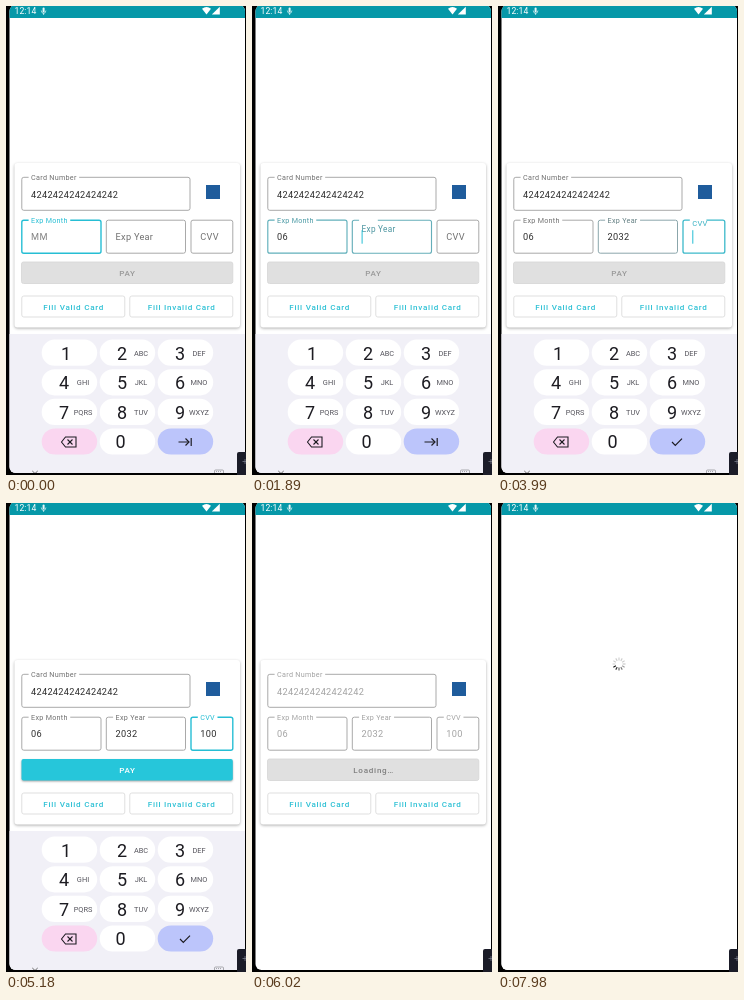
Animation of 240 by 469 pixels, one loop 8000 ms. Source, as an HTML page with a canvas:

```html
<!DOCTYPE html>
<html lang="en">
<head>
<meta charset="utf-8">
<title>Card payment form</title>
<style>
  html, body { margin: 0; width: 100%; height: 100%; overflow: hidden; background: #000; }
  canvas { display: block; width: 240px; height: 469px; }
</style>
</head>
<body>
<canvas id="stage"></canvas>
<script>
const LOOP = 8000;
const TO_YEAR = 1818, TO_CVV = 3882, PAY_TAP = 5210, NEW_PAGE = 6300, SPIN_START = 7280;
const CYAN = [38, 190, 212], GRAY = [160, 160, 160], LABEL = [112, 112, 112];
const INK = '#2b2b2b', FADED = '#a2a2a2';

const canvas = document.getElementById('stage');
const ctx = canvas.getContext('2d');
const ratio = window.devicePixelRatio || 1;
canvas.width = 240 * ratio;
canvas.height = 469 * ratio;

const ramp = (t, start, length = 150) => {
  const x = Math.min(1, Math.max(0, (t - start) / length));
  return x * x * (3 - 2 * x);
};
const lerp = (a, b, k) => a + (b - a) * k;
const mix = (a, b, k) => `rgb(${a.map((v, i) => lerp(v, b[i], k)).join()})`;

// Typed text: one character appears at each listed time.
const typed = (t, text, times) => text.slice(0, times.filter(at => t >= at).length);
const MONTH_KEYS = [1050, 1400], YEAR_KEYS = [2100, 2230, 3080, 3285], CVV_KEYS = [4200, 4340, 4480];
const CURSOR_RESETS = [-930, ...MONTH_KEYS, TO_YEAR, ...YEAR_KEYS, TO_CVV, ...CVV_KEYS];
const cursorOn = t => (t - CURSOR_RESETS.filter(at => at <= t).pop()) % 1000 < 500;

function text(str, x, y, size, color, { weight = 400, spacing = 0, align = 'left' } = {}) {
  ctx.font = `${weight} ${size}px Roboto, sans-serif`;
  ctx.letterSpacing = spacing + 'px';
  ctx.textAlign = align;
  ctx.fillStyle = color;
  ctx.fillText(str, x, y);
  return ctx.measureText(str).width;
}

function box(x, y, w, h, r, fill, stroke, width = 1) {
  ctx.beginPath();
  ctx.roundRect(x, y, w, h, r);
  if (fill) { ctx.fillStyle = fill; ctx.fill(); }
  if (stroke) { ctx.strokeStyle = stroke; ctx.lineWidth = width; ctx.stroke(); }
}

function line(points, color, width = 1, close = false) {
  ctx.beginPath();
  points.forEach(([x, y]) => ctx.lineTo(x, y));
  if (close) ctx.closePath();
  ctx.strokeStyle = color;
  ctx.lineWidth = width;
  ctx.stroke();
}

function shadowed(blur, dy, alpha, draw) {
  ctx.save();
  ctx.shadowColor = `rgba(0,0,0,${alpha})`;
  ctx.shadowBlur = blur * ratio;
  ctx.shadowOffsetY = dy * ratio;
  draw();
  ctx.restore();
}

function field({ x, y, w, label, value, hint = '', focus = 0, float = 1, cursor, disabled }) {
  box(x, y, w, 33, 2, null, mix(GRAY, CYAN, focus), lerp(0.9, 1.4, focus));
  const size = lerp(9.2, 7.2, float);
  const labelX = x + 9.3;
  ctx.font = `400 ${size}px Roboto, sans-serif`;
  ctx.letterSpacing = '0.28px';
  const gap = (ctx.measureText(label).width + 5) * float;
  ctx.fillStyle = '#fff';
  ctx.fillRect(labelX - 2.5, y - 2, gap, 4);
  text(label, labelX, lerp(y + 20.2, y + 2.6, float), size,
    disabled ? FADED : mix(LABEL, CYAN, focus), { spacing: 0.28 });
  const shown = value || hint;
  const ink = disabled ? FADED : value ? INK : '#858585';
  const width = text(shown, labelX, y + 20.2, 9.2, ink, { spacing: 0.28 });
  if (cursor) {
    ctx.fillStyle = mix(CYAN, CYAN, 0);
    ctx.fillRect(labelX + (value ? width : 0), y + 10, 1, 13.5);
  }
}

function button(label, x, y, w, h, fill, color, border) {
  box(x, y, w, h, 2, fill, border, 0.9);
  text(label, x + w / 2 + 0.4, y + h / 2 + 3, 8.1, color, { weight: 500, spacing: 0.72, align: 'center' });
}

function form(t) {
  const year = ramp(t, TO_YEAR), cvv = ramp(t, TO_CVV), paid = ramp(t, PAY_TAP, 100);
  const disabled = t >= PAY_TAP;
  const blink = !disabled && cursorOn(t);

  shadowed(3, 1, 0.32, () => box(8.5, 157, 225.5, 164.5, 3, '#fff'));
  field({ x: 15.8, y: 171.3, w: 168.2, label: 'Card Number', value: '4242424242424242', disabled });
  ctx.fillStyle = '#1f5c9c';
  ctx.fillRect(200, 179, 14, 14);

  const row = { y: 214.2, disabled };
  field({ ...row, x: 15.8, w: 79.2, label: 'Exp Month', hint: 'MM', value: typed(t, '06', MONTH_KEYS),
    focus: 1 - year, cursor: blink && t < TO_YEAR });
  field({ ...row, x: 100.3, w: 79.2, label: 'Exp Year', value: typed(t, '2032', YEAR_KEYS),
    focus: year - cvv, float: year, cursor: blink && t >= TO_YEAR && t < TO_CVV });
  field({ ...row, x: 185, w: 41.8, label: 'CVV', value: typed(t, '100', CVV_KEYS),
    focus: cvv - paid, float: cvv, cursor: blink && t >= TO_CVV });

  if (t >= CVV_KEYS[2] && !disabled) {
    shadowed(2, 1, 0.35, () => box(15.5, 256, 211.3, 21.5, 2, '#26c6da'));
    button('PAY', 15.5, 256, 211.3, 21.5, null, '#fff');
  } else {
    button(disabled ? 'Loading…' : 'PAY', 15.5, 256, 211.3, 21.5, '#e0e0e0', disabled ? '#808080' : '#999', '#d8d8d8');
  }
  button('Fill Valid Card', 15.8, 290, 103, 21, null, '#2fc1d5', '#dcdcdc');
  button('Fill Invalid Card', 123.8, 290, 103, 21, null, '#2fc1d5', '#dcdcdc');
}

const LETTERS = ['', 'ABC', 'DEF', 'GHI', 'JKL', 'MNO', 'PQRS', 'TUV', 'WXYZ'];
const KEY_INK = '#1d1c22';

function keyboard(t) {
  const drop = ramp(t, 5240, 330) * 145;
  if (drop >= 145) return;
  ctx.save();
  ctx.translate(0, drop);
  ctx.fillStyle = '#f1f0f7';
  ctx.fillRect(0, 328, 240, 141);
  for (let i = 0; i < 12; i++) {
    const col = i % 3, rowY = 333.6 + 29.6 * Math.floor(i / 3);
    const x = 35.7 + 58 * col;
    box(x, rowY, 55.5, 26.2, 13.1, i === 9 ? '#fad6f0' : i === 11 ? '#bcc5fb' : '#fff');
    const middle = [60, 116, 174][col] - (col === 0 && i ? 2 : 0);
    if (i < 9) {
      text(String(i + 1), middle, rowY + 20, 18, KEY_INK, { align: 'center' });
      const letters = LETTERS[i];
      text(letters, [77, 135, 193][col], rowY + 16, 7.4, '#55545c', { align: 'center' });
    } else if (i === 10) {
      text('0', 114.5, rowY + 20, 18, KEY_INK, { align: 'center' });
    }
  }
  line([[55.5, 436], [59.5, 431], [70, 431], [70, 441], [59.5, 441]], KEY_INK, 1.1, true);
  line([[61.5, 433.5], [66.5, 438.5]], KEY_INK, 1.1);
  line([[66.5, 433.5], [61.5, 438.5]], KEY_INK, 1.1);
  if (t < TO_CVV) {
    line([[172.5, 436], [183, 436]], KEY_INK, 1.2);
    line([[179.5, 432.5], [183, 436], [179.5, 439.5]], KEY_INK, 1.2);
    line([[185.2, 432], [185.2, 440]], KEY_INK, 1.2);
  } else {
    line([[174, 436], [177.3, 439.3], [184, 432.6]], KEY_INK, 1.2);
  }
  line([[26.3, 465], [29, 467.5], [31.7, 465]], '#666', 1);
  box(208.5, 464, 9, 5, 1, null, '#8a8a90', 0.7);
  ctx.setLineDash([1, 1]);
  line([[210, 465.6], [216, 465.6]], '#8a8a90', 0.8);
  ctx.restore();
}

function spinner(t) {
  const head = 8 - Math.ceil((7980 - t) / 83);
  for (let i = 0; i < 12; i++) {
    const age = (((head - i) % 12) + 12) % 12;
    const angle = i * Math.PI / 6;
    const at = r => [121 + r * Math.sin(angle), 161 - r * Math.cos(angle)];
    line([at(3.6), at(6.5)], `rgba(0,0,0,${Math.max(0.2, 0.95 - age * 0.14)})`, 1.1);
  }
}

function statusBar() {
  ctx.fillStyle = '#0698a8';
  ctx.fillRect(0, 0, 240, 12);
  text('12:14', 8.5, 8.2, 8.6, '#fff', { spacing: 0.1 });
  box(36.6, 1.5, 2, 5, 1, '#e8f6f8');
  line([[35.3, 4.5], [36, 6.7], [37.6, 7.4], [39.2, 6.7], [39.9, 4.5]], '#e8f6f8', 0.7);
  line([[37.6, 7], [37.6, 9]], '#e8f6f8', 0.7);
  ctx.fillStyle = '#fff';
  ctx.beginPath();
  ctx.moveTo(200.5, 8.5);
  ctx.lineTo(196, 2.8);
  ctx.quadraticCurveTo(200.5, -0.6, 205, 2.8);
  ctx.fill();
  ctx.beginPath();
  ctx.moveTo(205.8, 8.5);
  ctx.lineTo(213.8, 8.5);
  ctx.lineTo(213.8, 0.8);
  ctx.fill();
}

function draw(t) {
  ctx.setTransform(ratio, 0, 0, ratio, 0, 0);
  ctx.fillStyle = '#000';
  ctx.fillRect(0, 0, 240, 469);
  ctx.save();
  ctx.beginPath();
  ctx.roundRect(3.5, -1, 235.5, 468, 6);
  ctx.clip();
  ctx.fillStyle = '#fff';
  ctx.fillRect(0, 0, 240, 469);
  form(t);
  keyboard(t);
  ctx.fillStyle = `rgba(255,255,255,${ramp(t, NEW_PAGE, 400)})`;
  ctx.fillRect(0, 12, 240, 457);
  if (t >= SPIN_START) spinner(t);
  statusBar();
  ctx.restore();
  box(231, 446, 14, 30, 2, '#1b1c28');
  line([[236.5, 455.5], [240, 455.5]], '#777a88', 0.8);
  line([[239, 453], [239, 458]], '#777a88', 0.8);
}

function tick() {
  draw(performance.now() % LOOP);
  requestAnimationFrame(tick);
}
tick();
</script>
</body>
</html>
```
